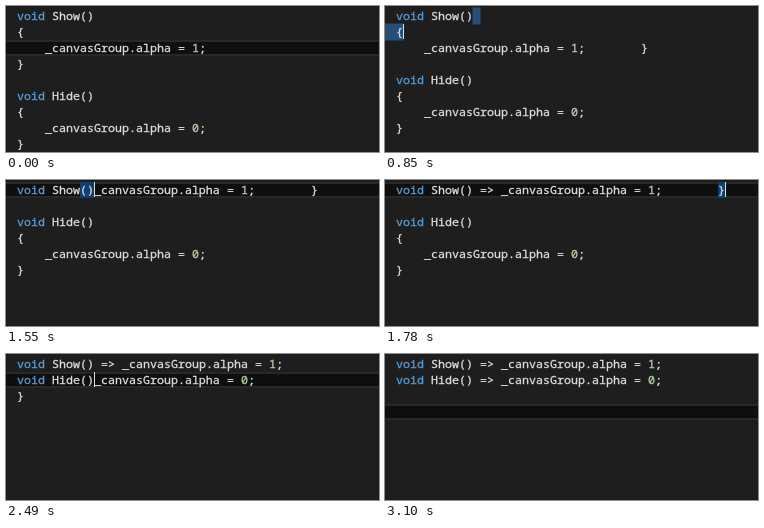
An HTML page with a canvas that plays this animation: 373x146 px, repeating every 4800 ms.

```html
<!DOCTYPE html>
<html lang="en">
<head>
<meta charset="utf-8">
<title>Refactoring to expression bodies</title>
<style>
  html, body { margin: 0; width: 100%; height: 100%; overflow: hidden; background: #1e1e1e; }
  canvas { display: block; }
</style>
</head>
<body>
<canvas id="stage" width="373" height="146"></canvas>
<script>
const ctx = document.getElementById('stage').getContext('2d');
const LOOP = 4800, CHAR = 7, LINE = 16, LEFT = 11, TOP = 2;
const colX = col => LEFT + col * CHAR;
const rowY = row => TOP + row * LINE;

// Code fragments
const setAlpha = n => `_canvasGroup.alpha = ${n};`;
const indented = n => '    ' + setAlpha(n);
const tail = '        }';
const show = 'void Show()', hide = 'void Hide()';
const block = (head, n) => [head, '{', indented(n), '}'];
const hideBlock = block(hide, 0);
const showLine = show + ' => ' + setAlpha(1);
const hideLine = hide + ' => ' + setAlpha(0);

// Documents at each stage of the edit
const start = [...block(show, 1), '', ...hideBlock];
const braceJoined = [show, '{', indented(1) + tail, '', ...hideBlock];
const openRemoved = [show, indented(1) + tail, '', ...hideBlock];
const typeShow = arrow => [show + arrow + setAlpha(1) + tail, '', ...hideBlock];
const showDone = [showLine, '', ...hideBlock];
const gapRemoved = [showLine, ...hideBlock];
const hideJoined = [showLine, hide + setAlpha(0), '}'];
const hideTyped = [showLine, hideLine, '}'];
const done = [showLine, hideLine];

// Selections and brace marks: [row, first column, end column]; -2 is past the left edge
const selBrace = [[0, 11, 12], [1, -2, 1]];
const selIndent = [[0, 11, 12], [1, -2, 4]];
const selHide = [[1, 11, 12], [2, -2, 2], [3, -2, 4]];
const selClose = [[1, 38, 39], [2, -2, 1]];
const parens = row => [row, 9, 11];
const closeMark = [2, 0, 1];

// caret: [row, column]; row: highlighted current line
const states = [
  { at: 0, text: start, row: 2 },
  { at: 150, text: start, row: 2, caret: [2, 27] },
  { at: 620, text: start, row: 2 },
  { at: 700, text: start, row: 2, caret: [2, 27] },
  { at: 850, text: braceJoined, sel: selBrace, caret: [1, 1] },
  { at: 1080, text: braceJoined, sel: selBrace },
  { at: 1170, text: braceJoined, sel: selBrace, caret: [1, 1] },
  { at: 1320, text: openRemoved, sel: selIndent, caret: [1, 4] },
  { at: 1470, text: typeShow(''), row: 0, caret: [0, 11] },
  { at: 1550, text: typeShow(''), row: 0, caret: [0, 11], mark: parens(0) },
  { at: 1630, text: typeShow(' ='), row: 0, caret: [0, 13] },
  { at: 1700, text: typeShow(' => '), row: 0, caret: [0, 15] },
  { at: 1780, text: typeShow(' => '), row: 0, caret: [0, 47], mark: [0, 46, 47] },
  { at: 1930, text: typeShow(' => '), row: 0, caret: [0, 47] },
  { at: 2100, text: showDone, row: 0 },
  { at: 2250, text: gapRemoved, sel: selHide, caret: [3, 4], mark: parens(1) },
  { at: 2490, text: hideJoined, row: 1, caret: [1, 11] },
  { at: 2570, text: hideJoined, row: 1, caret: [1, 11], mark: parens(1) },
  { at: 2720, text: hideTyped, sel: selClose, mark: closeMark },
  { at: 2800, text: hideTyped, sel: selClose, mark: closeMark, caret: [2, 1] },
  { at: 2950, text: hideTyped, sel: selClose, caret: [2, 1] },
  { at: 3100, text: done, row: 3 }
];

function fill(color, x, y, w, h) {
  ctx.fillStyle = color;
  ctx.fillRect(x, y, w, h);
}

function fillSpan(color, [row, from, to]) {
  fill(color, colX(from), rowY(row), (to - from) * CHAR, LINE);
}

function drawCurrentLine(row) {
  fill('#282828', 0, rowY(row), 373, LINE);
  fill('#0f0f0f', 0, rowY(row) + 2, 373, LINE - 4);
}

function drawSelection(spans) {
  ctx.lineWidth = 1;
  ctx.strokeStyle = '#264f78';
  for (const span of spans) {
    const [row, from, to] = span;
    fillSpan('#264f78', span);
    ctx.strokeRect(colX(from), rowY(row), (to - from) * CHAR, LINE);
  }
}

function drawCode(line, row) {
  ctx.lineWidth = 0.3; // a hairline outline gives the glyphs more weight
  for (const token of line.matchAll(/void|\d|[^\s\d]+/g)) {
    const [word] = token;
    const color = word === 'void' ? '#569cd6' : /\d/.test(word) ? '#b5cea8' : '#dcdcdc';
    const x = colX(token.index), y = rowY(row) + 12;
    ctx.fillStyle = ctx.strokeStyle = color;
    ctx.fillText(word, x, y);
    ctx.strokeText(word, x, y);
  }
}

function draw(state) {
  fill('#1e1e1e', 0, 0, 373, 146);
  if (state.row !== undefined) drawCurrentLine(state.row);
  if (state.sel) drawSelection(state.sel);
  if (state.mark) fillSpan('#113d6f', state.mark);
  ctx.font = '11.667px "Noto Sans Mono", "DejaVu Sans Mono", monospace';
  state.text.forEach(drawCode);
  if (state.caret) fill('#dcdcdc', colX(state.caret[1]), rowY(state.caret[0]), 1, 15);
}

function tick() {
  const time = performance.now() % LOOP;
  draw(states.findLast(state => state.at <= time));
  requestAnimationFrame(tick);
}
tick();
</script>
</body>
</html>
```
